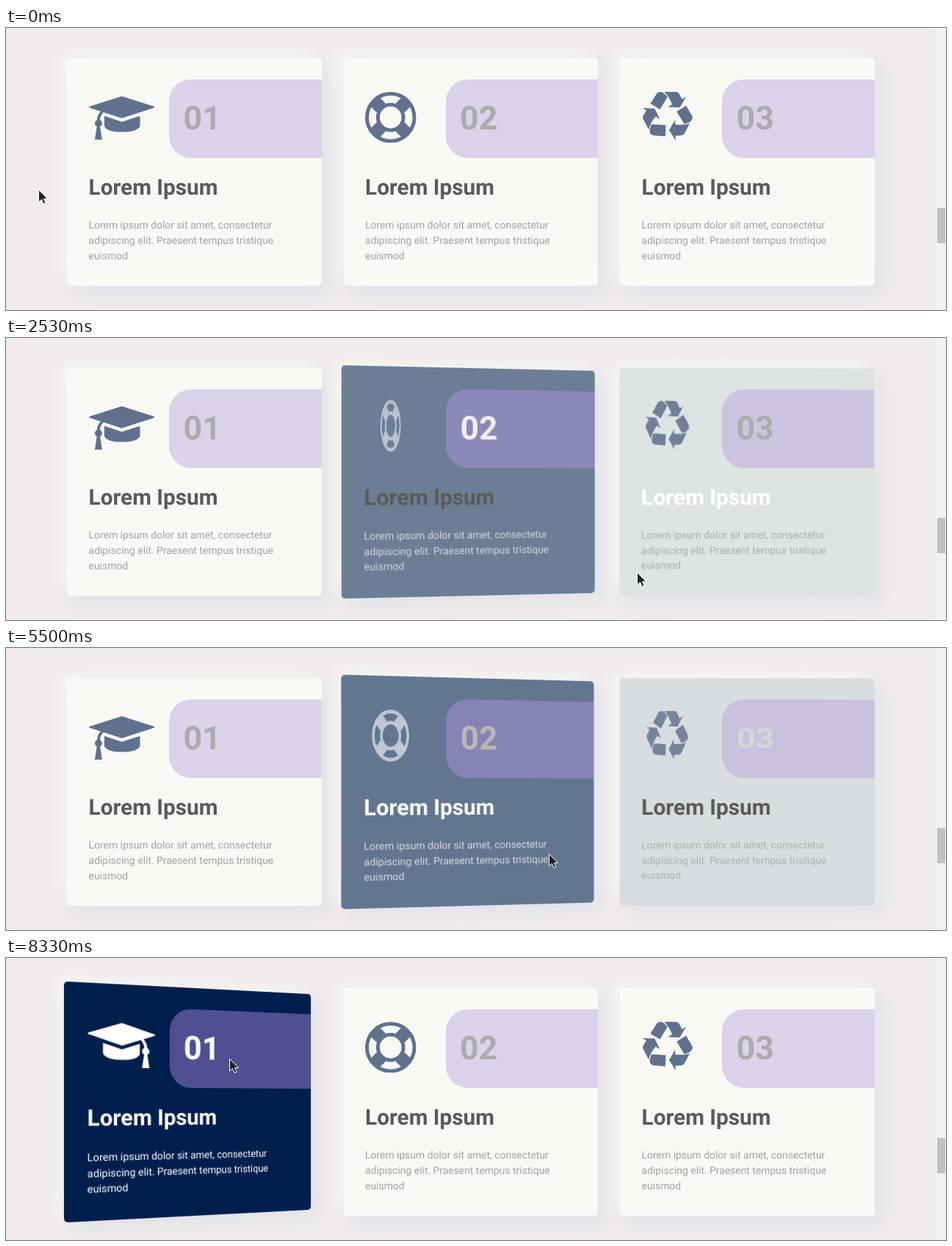
An HTML page for the animation above (8.73 s loop, 1280x384 px).

```html
<!DOCTYPE html>
<html lang="en">
<head>
<meta charset="utf-8">
<title>Service cards</title>
<style>
  html, body { margin: 0; width: 100%; height: 100%; overflow: hidden; background: #f0eaea; }
  body { position: relative; font-family: Roboto, sans-serif; text-rendering: geometricPrecision; }
  .card {
    position: absolute; top: 41.3px; width: 346.8px; height: 309.7px; border-radius: 5px;
    box-shadow: 10px 10px 20px #d9dfecb0, -10px -10px 20px #f8f9f5b0;
  }
  .card > * { position: absolute; margin: 0; left: 29.6px; }
  .icon { top: 45.4px; height: 69.5px; fill: currentColor; }
  .band {
    left: 139px !important; right: 0; top: 28.7px; height: 107px; border-radius: 30px 0 0 30px;
    padding-left: 19.6px; font: 700 44.6px/107px Roboto, sans-serif;
  }
  .band span { display: inline-block; }
  h3 { top: 158.7px; font-size: 29.75px; line-height: 35px; white-space: nowrap; }
  p { top: 217.8px; width: 287px; font-size: 13.9px; line-height: 20.85px; }
  .track { position: absolute; left: 1266px; top: 0; width: 14px; height: 384px; background: #f1f1f1; }
  .thumb { position: absolute; left: 2px; top: 245px; width: 11px; height: 48px; background: #c1c1c1; }
  #pointer { position: absolute; left: 0; top: 0; width: 1px; height: 1px; overflow: visible; }
</style>
</head>
<body>
<div class="track"><div class="thumb"></div></div>
<svg id="pointer">
  <path id="arrow" d="M0 0V16.5L4 13 6.5 19 9.5 17.7 7 12H12Z" fill="#222" stroke="#fff"/>
  <g id="beam" fill="none">
    <path d="M-3-9.5H-1L0-8.5 1-9.5H3M0-8.5V8.5M-3 9.5H-1L0 8.5 1 9.5H3" stroke="#fff" stroke-width="3"/>
    <path d="M-3-9.5H-1L0-8.5 1-9.5H3M0-8.5V8.5M-3 9.5H-1L0 8.5 1 9.5H3" stroke="#222"/>
  </g>
</svg>
<script>
const LOOP = 8730, FIRST = 83, STEP = 376.5;

const icons = [
  [90, `<path d="M44 6.2Q45 5.8 46 6.2L89 20Q91 21 89 22L46 35.8Q45 36.2 44 35.8L1 22Q-1 21 1 20Z
    M21 33L45 41 70 33V47Q66 55 45 55 25 55 21 47Z M17 26l4 1Q15 32 15 39h-4Q11 31 17 26Z
    M8 43a5 5 0 0 1 10 0 5 5 0 0 1-10 0M11 46h4l3 19.5H8Z"/>`],
  [70, `<g fill="none" stroke="currentColor" stroke-width="5"><circle cx="35" cy="35" r="32.5"/>
    <circle cx="35" cy="35" r="17.5"/>
    <path stroke-width="17.5" d="M13 13l9 9M57 13l-9 9M13 57l9-9M57 57l-9-9"/></g>`],
  [70, `<path d="M32.7 45.7L32 60.9 15.6 59.8Q10 58 10.6 53 11 50 12.8 44.6 16 44 32.7 45.7Z
    M17.5 22.8l7.1 14.8-5.8-3.6Q11.5 42 9.2 51.5L1.8 37.5Q.5 35 1.6 32.8L6.1 25.5 .6 22.1Z
    M65.6 43L58.3 57Q57 59.2 54.5 59.8L45.9 60.2l.3 6.4-9-14.3 8.3-14.1.2 6.7Q60 45.5 65.6 43Z
    M35 6.9L24.6 23.9 11.5 16.1 20.3 2.2Q22 0 25.7 0 30 .5 35 6.9Z
    M60.5 18.9l8.3 14.2Q70 36 68 39 65.5 42.4 57.9 43.9L47.6 26.9Z
    M55 10l5.5-3.2-8.6 14.6-16.4-.8 5.9-3.4Q37 6 30.5 0H46.4Q49.5 .3 50.6 2.1Z"/>`]
];

// [enter, leave] times of the pointer, per card
const hovers = [
  [[640, 1405], [6150, LOOP]],
  [[1440, 2400], [5320, 6030]],
  [[2475, 5215]]
];

// pointer path: time, x, y
const path = [
  [0, 44, 220], [400, 44, 220], [640, 83, 236], [1000, 210, 302], [1330, 395, 321],
  [1440, 458, 323], [1800, 616, 322], [2200, 730, 322], [2400, 800, 320], [2475, 836, 319],
  [2800, 972, 317], [3130, 985, 296], [4030, 1010, 205], [4700, 1020, 143], [4930, 1016, 146],
  [5215, 836, 232], [5320, 800, 256], [5500, 740, 280], [6030, 460, 277], [6150, 415, 273],
  [6430, 287, 265], [6730, 255, 231], [7600, 265, 207], [8330, 304, 137], [LOOP, 304, 137]
];

const $ = id => document.getElementById(id);
const pointer = $('pointer');

const cards = icons.map(([width, art], i) => {
  const card = document.createElement('div');
  card.className = 'card';
  card.style.left = FIRST + i * STEP + 'px';
  card.innerHTML = `<svg class="icon" viewBox="0 0 ${width} 70">${art}</svg>
    <div class="band"><span>0${i + 1}</span></div>
    <h3>Lorem Ipsum</h3>
    <p>Lorem ipsum dolor sit amet, consectetur adipiscing elit. Praesent tempus tristique euismod</p>`;
  document.body.insertBefore(card, pointer);
  const find = name => card.querySelector(name).style;
  return { card: card.style, icon: find('.icon'), band: find('.band'),
           number: find('span'), title: find('h3'), text: find('p') };
});

// CSS "ease" timing: cubic-bezier(.25, .1, .25, 1)
function ease(x) {
  if (x <= 0) return 0;
  if (x >= 1) return 1;
  const bezier = (a, b, s) => 3 * a * s * (1 - s) ** 2 + 3 * b * s * s * (1 - s) + s ** 3;
  let lo = 0, hi = 1;
  for (let i = 0; i < 20; i++) {
    const mid = (lo + hi) / 2;
    if (bezier(.25, .25, mid) < x) lo = mid; else hi = mid;
  }
  return bezier(.1, 1, lo);
}

const level = (spans, t, rise, fall = rise) => spans.reduce((sum, [enter, leave]) =>
  sum + ease((Math.min(t, leave) - enter) / rise) * (1 - ease((t - leave) / fall)), 0);

const mix = (from, to, v) => `rgb(${from.map((c, i) => c + (to[i] - c) * v)})`;
const grey = c => [c, c, c];
const WHITE = grey(255);

function drawCard(el, i, t) {
  const spans = hovers[i];
  const tone = level(spans, t, 520, 500);
  const tilt = level(spans, t, 600, 400);
  const over = spans.some(([enter, leave]) => t >= enter && t < leave);
  const squash = i === 2 ? level([[4200, 5450]], t, 450) : 0;
  el.card.transform = tilt ? `perspective(800px) rotateY(${15 * tilt}deg)` : 'none';
  el.card.background = mix([248, 249, 245], [0, 31, 77], tone);
  el.icon.color = mix([95, 113, 141], WHITE, tone);
  el.icon.transform = `rotateY(${180 * level(spans, t, 400, 560)}deg)`;
  el.band.background = mix([219, 209, 233], [80, 80, 145], tone);
  el.number.color = mix(grey(170), WHITE, level(spans, t, 1300, 1000));
  el.number.transform = `scaleY(${1 - .18 * squash})`;
  el.title.color = over ? '#fff' : '#5a5a58';
  el.text.color = mix(grey(161), WHITE, tone);
}

function overText(x, y) {
  const left = (x - FIRST) % STEP;
  if (x < FIRST || left < 30) return false;
  return y > 202 && y < 234 && left < 205 || y > 260 && y < 301 && left < 278;
}

function drawPointer(t) {
  const next = path.findIndex(p => p[0] > t);
  const [t0, x0, y0] = path[next - 1], [t1, x1, y1] = path[next];
  const part = (t - t0) / (t1 - t0);
  const x = x0 + (x1 - x0) * part, y = y0 + (y1 - y0) * part;
  const text = overText(x, y);
  pointer.style.transform = `translate(${Math.round(x) + .5}px, ${Math.round(y) + .5}px)`;
  $('arrow').style.display = text ? 'none' : '';
  $('beam').style.display = text ? '' : 'none';
}

function draw() {
  const t = performance.now() % LOOP;
  cards.forEach((el, i) => drawCard(el, i, t));
  drawPointer(t);
  requestAnimationFrame(draw);
}
draw();
</script>
</body>
</html>
```
